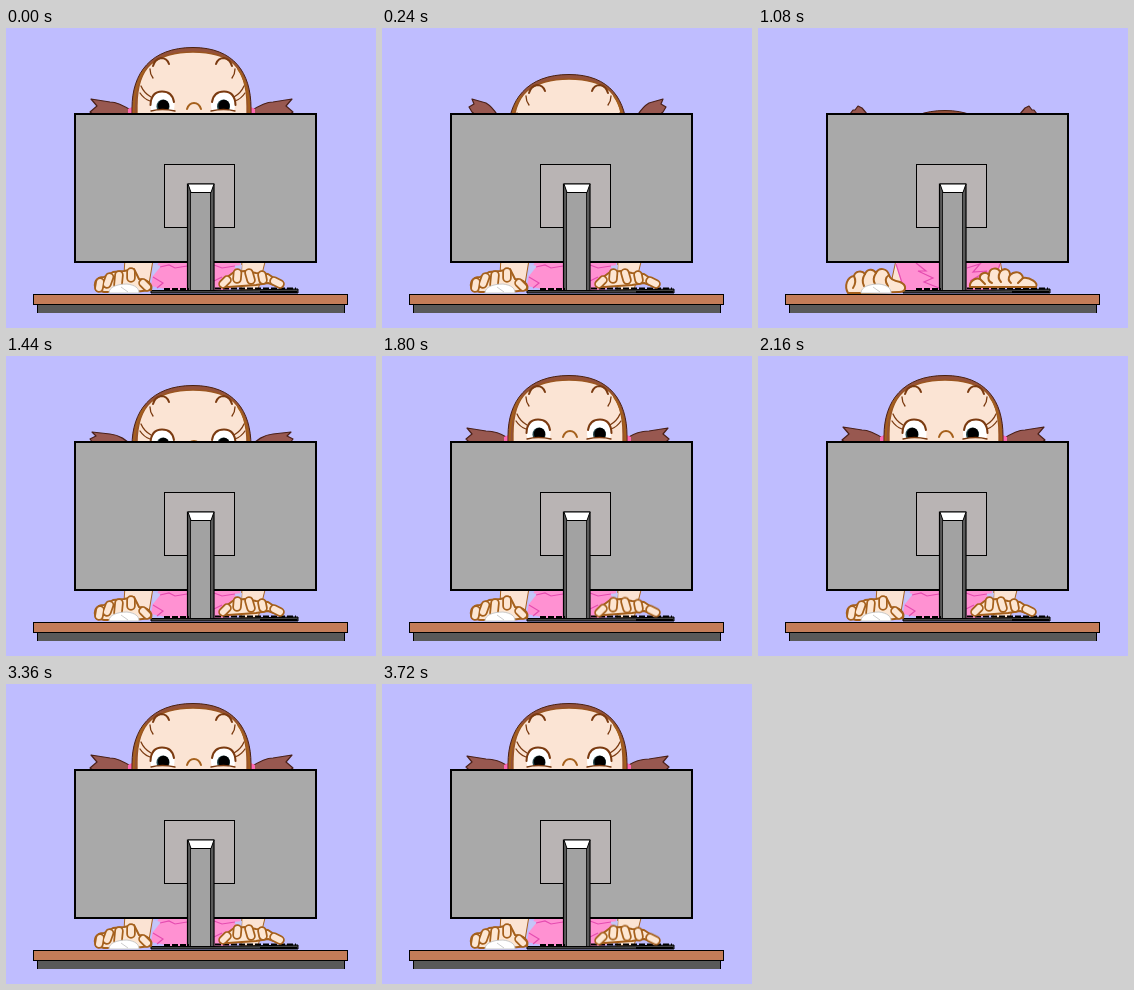
Animation, 370 px wide and 300 px high, one loop 3840 ms. Source, as an HTML page without scripts:

```html
<!DOCTYPE html>
<html lang="en">
<head>
<meta charset="utf-8">
<title>Girl behind a monitor</title>
<style>
html, body { margin: 0; width: 100%; height: 100%; overflow: hidden; background: #bfbdff; }
svg { display: block; width: 100%; height: 100%; }

.head, .tail, .gaze, .up, .down { animation: 3.84s step-end infinite; }
.head { animation-name: duck; }
.tail { animation-name: swing; fill: #985850; stroke: #4a2018; stroke-width: 1.2; stroke-linejoin: round; }
.gaze { animation-name: look; }
.up { animation-name: show-up; }
.down { animation-name: show-down; }
.tap { animation: tap .24s step-end infinite; }

.ink { fill: none; stroke: #7a3a10; stroke-width: 1.3; stroke-linecap: round; }
.bold { stroke-width: 2; }
.hand { fill: #fde6d2; stroke: #a5601c; stroke-width: 2; stroke-linejoin: round; stroke-linecap: round; }
.crease { fill: none; }
.edge { stroke-width: 9.5; }
.pad { stroke: #fde6d2; stroke-width: 6; }
.skin { fill: #fbe3d3; stroke: #a5601c; }
.fold { fill: none; stroke: #e54bb0; stroke-width: 1.2; }
.crisp { shape-rendering: crispEdges; }

@keyframes duck {
  0% { transform: none; }
  3.125% { transform: translateY(10px); }
  6.25% { transform: translateY(27px); }
  9.375% { transform: translateY(45px); }
  12.5% { transform: translateY(63px); }
  31.25% { transform: translateY(45px); }
  34.375% { transform: translateY(27px); }
  37.5% { transform: translateY(10px); }
  40.625%, 100% { transform: none; }
}

/* pigtail poses, from hanging to thrown up */
svg {
  --hang: path("M126 83C120 79 112 74 104 74L85 71L91 78L84 84L88 87C102 84 114 86 126 87Z");
  --flat: path("M126 82C120 78 112 75 104 75L85 72L90 78L84 83L88 87C102 85 114 86 126 87Z");
  --lift: path("M126 80C120 74 114 69 104 68L86 66L90 70L84 73L87 77C102 77 114 82 126 86Z");
  --rise: path("M126 80C120 68 114 54 104 48L90 44L92 49L87 52L90 57C102 66 114 79 126 86Z");
  --high: path("M126 80C122 62 114 40 105 31L97 27L95 32L90 35L92 40C102 59 114 78 126 86Z");
  --fly: path("M126 80C122 50 115 28 104 17L100 15L97 19L95 19L92 23C96 42 110 75 126 86Z");
}
@keyframes swing {
  0% { d: var(--hang); }
  3.125% { d: var(--lift); }
  6.25% { d: var(--rise); }
  9.375% { d: var(--high); }
  12.5% { d: var(--fly); }
  31.25% { d: var(--high); }
  34.375% { d: var(--rise); }
  37.5% { d: var(--lift); }
  40.625%, 46.875%, 53.125%, 59.375%, 65.625%, 71.875%, 78.125%, 84.375%, 90.625%, 96.875% { d: var(--flat); }
  43.75%, 50%, 56.25%, 62.5%, 68.75%, 75%, 81.25%, 87.5%, 93.75%, 100% { d: var(--hang); }
}
@keyframes look {
  0% { transform: none; }
  50% { transform: translateX(-3px); }
  65.625%, 100% { transform: none; }
}
@keyframes show-up {
  0% { visibility: visible; }
  9.375% { visibility: hidden; }
  34.375%, 100% { visibility: visible; }
}
@keyframes show-down {
  0% { visibility: hidden; }
  9.375% { visibility: visible; }
  34.375%, 100% { visibility: hidden; }
}
@keyframes tap {
  0% { transform: none; }
  50%, 100% { transform: translateY(.6px); }
}
</style>
</head>
<body>
<svg viewBox="0 0 370 300">
  <defs>
    <g id="lashes">
      <path class="ink" d="M144 41Q144 46 147 50M135 58Q138 65 145 69M134 65Q138 71 144 73"/>
      <path class="ink bold" d="M147 38Q149 31 155 30Q161 30 163 36"/>
    </g>
    <ellipse id="eyeball" cx="156.500" cy="77" rx="12" ry="13" fill="#fff"/>
    <g id="pupil">
      <ellipse cx="157" cy="78.500" rx="6.500" ry="7" fill="#28494d"/>
      <ellipse cx="157.500" cy="78" rx="5.600" ry="6.300"/>
    </g>
    <g id="lids">
      <path d="M143 84Q156 79.500 170 83V95H143Z" fill="#fbe4d4"/>
      <path class="ink" stroke="#a5601c" d="M145 83Q156 80 169 83"/>
      <path class="ink bold" d="M144.500 77C145 67 150 63.500 156 63.500C163 63.500 167 68 168 74"/>
    </g>
    <path id="left-fingers" d="M94 254L93 260M103.500 249L101 256M113 247L112 257M125 244L125 250M137 255L141 259"/>
    <path id="right-fingers" d="M221 252L217 256M231.500 245L231 251M243 245L245 252M256 247L257 252M268 253L274 256"/>
  </defs>

  <rect width="370" height="300" fill="#bfbdff"/>

  <g class="head">
    <path class="tail"/>
    <g transform="translate(371) scale(-1 1)"><path class="tail"/></g>
    <path d="M122 81L126 79V87H122ZM249 81L245 79V87H249Z" fill="#ff69b4"/>
    <path d="M127 130C126 110 126 95 126 80C126 45 145 19.500 187 19.500C228 19.500 245 45 245 80V130Z" fill="#94513a" stroke="#4a2010"/>
    <path d="M131 130V78C131 58 136 44 145 36C156 27 172 24 187 24C202 24 218 27 228 36C236 44 241 58 241 78V130Z" fill="#fbe4d4" stroke="#9a5520" stroke-width="1.300"/>
    <path d="M127.500 88C127.500 70 130 53 139 41M243.500 88C243.500 70 241 53 232 41" fill="none" stroke="#a5601c" stroke-width="2"/>
    <use href="#lashes"/>
    <use href="#lashes" transform="translate(373) scale(-1 1)"/>
    <use href="#eyeball"/>
    <use href="#eyeball" x="60.500"/>
    <g class="gaze">
      <use href="#pupil"/>
      <use href="#pupil" x="60.500"/>
    </g>
    <use href="#lids"/>
    <use href="#lids" transform="translate(374) scale(-1 1)"/>
    <path class="ink bold" style="stroke:#a5601c" d="M181 81Q183 75 188 75Q193 75 195 81"/>
  </g>

  <g class="up">
    <path class="skin" d="M119 230L117 262H142L147 232ZM236 230L235 262H252L260 230Z"/>
    <path d="M154 232H234V254L222 262H165L145 258L147 246Z" fill="#ff91d2"/>
    <path d="M147 236L155 238L147 248ZM236 237L228 238L235 247Z" fill="#c4c6f8"/>
    <path class="fold" d="M154 239L163 237L169 240L181 238M147 249L157 255L151 260M208 237L216 240L229 238M208 253L216 249"/>
  </g>
  <g class="down">
    <path class="skin" d="M138 232L132 260H146L142 232ZM242 232L247 260H234L238 232Z"/>
    <path d="M137 230H243L237 262H145Z" fill="#ff91d2"/>
    <path class="fold" d="M138 236L145 258M158 235L168 243L160 243L175 250L166 254L181 260M209 240L222 236L215 244L229 243L212 253M242 236L236 255"/>
  </g>

  <g stroke="#000">
    <rect class="crisp" x="69" y="86" width="241" height="148" fill="#a9a9a9" stroke-width="2"/>
    <rect class="crisp" x="158.500" y="136.500" width="70" height="63" fill="#b9b4b4"/>
    <path d="M181.500 156H208V263H181.500Z" fill="#5a5a5a" stroke-width="1.200"/>
    <path d="M184.500 164H204.500V263H184.500Z" fill="#a2a2a2" stroke-width=".8"/>
    <path d="M182 156H208L205 164.500H185Z" fill="#fff"/>
    <path d="M145 262.500H208L292 261V265H145Z" fill="#444"/>
    <path d="M158 261H183M209 260.500H290" stroke-width="2" stroke-dasharray="6 2"/>
    <path d="M254 264H291" stroke-width="2"/>
  </g>

  <g class="hand">
    <g class="up">
      <path d="M90 262C87 255 90 249 98 249L107 244L118 243L128 241L133 251C141 251 147 256 145 262L128 264H98Z"/>
      <use class="edge" href="#left-fingers"/>
      <use class="pad" href="#left-fingers"/>
      <path d="M214 257L220 250L228 244L239 243L250 245L262 246L268 250L277 255L274 259L262 255L250 257L222 259Z"/>
      <g class="tap">
        <use class="edge" href="#right-fingers"/>
        <use class="pad" href="#right-fingers"/>
      </g>
    </g>
    <g class="down">
      <path d="M90 265C86 258 89 249 96 248C97 243 104 242 107 246C109 241 115 240 118 245C121 239 129 240 131 247C132 251 136 253 142 254C149 257 149 264 141 264L110 265Z"/>
      <path class="crease" d="M96 248Q99 254 95 260M107 246Q103 252 106 258M118 245Q114 251 117 256M131 247Q125 251 130 258"/>
      <path d="M212 259C211 254 217 249 222 251C221 245 228 243 231 247C231 239 240 239 242 244C246 239 252 241 252 247C257 242 264 244 265 250C272 249 281 255 278 259L264 259Z"/>
      <path class="crease" d="M222 251L227 256M231 247Q229 253 234 255M242 244Q239 250 243 254M252 247Q249 252 253 255M265 250L260 255"/>
    </g>
  </g>
  <path d="M103 265C103 259 111 256 121 256C129 257 133 260 133 265Z" fill="#fff" stroke="#c8c8c8"/>
  <path d="M115 259L122 264" stroke="#ccc"/>

  <g class="crisp" stroke="#000">
    <rect x="31" y="277" width="308" height="8" fill="#595959" stroke="none"/>
    <path d="M31.500 277V285M338.500 277V285"/>
    <rect x="27.500" y="266.500" width="314" height="10" fill="#c47c58"/>
  </g>
</svg>
</body>
</html>
```
